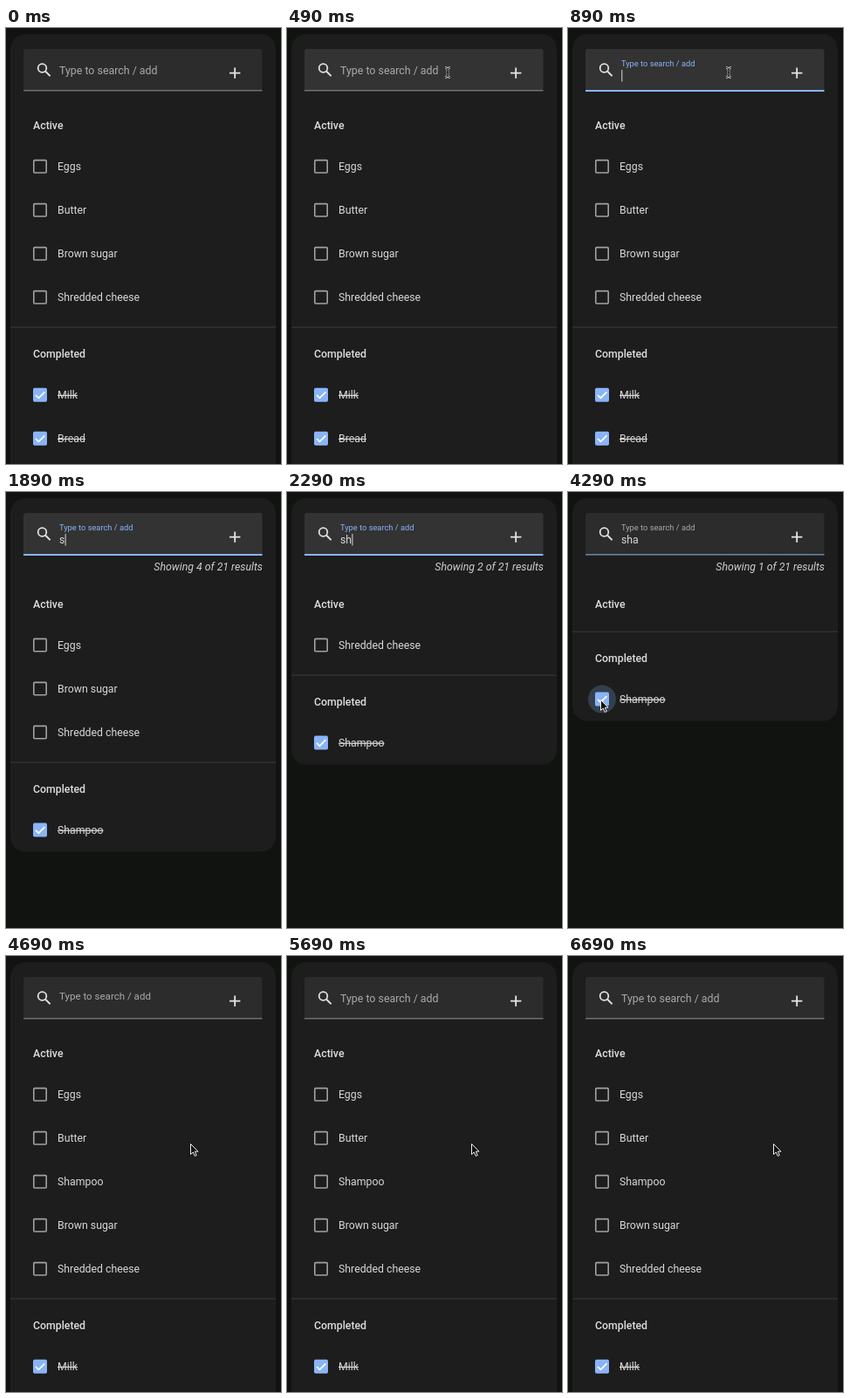
These frames come from a looping animation (315 px wide and 500 px high, 6.89 s). An HTML page:

```html
<!DOCTYPE html>
<html lang="en">
<head>
<meta charset="utf-8">
<title>Shopping list</title>
<style>
  html, body { margin: 0; width: 100%; height: 100%; overflow: hidden; background: #111311; }
  svg { display: block; width: 315px; height: 500px; }
  text { font: 400 12.3px Roboto, Arial, sans-serif; fill: #d9d9d9; white-space: pre; }
  .heading { font-weight: 500; fill: #dedede; }
  .done { text-decoration: line-through; }
  .count { font-style: italic; text-anchor: end; fill: #d0d0d0; }
</style>
</head>
<body>
<svg id="stage" viewBox="0 0 315 500"></svg>
<script>
const LOOP = 6890;
const BLUE = '#8ab4f8';
const stage = document.getElementById('stage');

// The picture advances in discrete steps.
const ticks = [0, 100, 290, 490, 690, 890, 1290, 1690, 1890, 2090, 2290, 2490, 2690,
  3090, 3290, 3490, 3690, 3890, 4090, 4290, 4490, 4690, 4890, 6690];

// Pointer: [time, x, y, shape]
const pointer = [
  [0, 0, 0, ''], [100, 225, 190, 'arrow'], [290, 202, 104, 'arrow'], [490, 184, 51, 'beam'],
  [1690, 0, 0, ''], [3090, 184, 51, 'beam'], [3290, 174, 136, 'arrow'], [3490, 144, 219, 'arrow'],
  [3690, 90, 231, 'arrow'], [3890, 48, 238, 'arrow'], [4090, 37, 238, 'arrow'],
  [4690, 211, 215, 'arrow'], [6690, 235, 215, 'arrow']
];
const typed = [[0, ''], [1690, 's'], [2090, 'sh'], [2490, 'sha'], [4690, '']];
const caretOn = [[0, false], [690, true], [1290, false], [1690, true], [3090, false]];
// How far the label floats above the field
const labelFloat = [[0, 0], [690, .8], [890, 1], [4690, .27], [4890, 0]];

const latest = (keys, t) => keys.findLast(key => key[0] <= t);
const between = (t, a, b) => t >= a && t < b;

const rect = (x, y, w, h, fill, extra = '') =>
  `<rect x="${x}" y="${y}" width="${w}" height="${h}" fill="${fill}" ${extra}/>`;
const path = (d, stroke, width, extra = '') =>
  `<path d="${d}" fill="none" stroke="${stroke}" stroke-width="${width}" ${extra}/>`;
const text = (x, y, content, extra = '') => `<text x="${x}" y="${y}" ${extra}>${content}</text>`;

function checkbox(y, checked) {
  return checked
    ? rect(31, y - 8, 16, 16, BLUE, 'rx="1.8"') + path(`M34 ${y + .2}l3.4 3.4 7-7`, '#fff', 1.7)
    : rect(31.8, y - 7.2, 14.4, 14.4, 'none', 'rx="1" stroke="#a2a2a2" stroke-width="1.6"');
}

function row(name, y, done, checked = done) {
  return checkbox(y, checked) + text(59, y + 4.3, name, done ? 'class="done"' : '');
}

function listState(t, query) {
  const moved = t >= 4690;
  const active = ['Eggs', 'Butter', ...(moved ? ['Shampoo'] : []), 'Brown sugar', 'Shredded cheese'];
  const completed = query ? ['Shampoo'] : ['Milk', 'Bread'];
  const matches = name => name.toLowerCase().includes(query);
  return { active: active.filter(matches), completed };
}

function drawList(t, query) {
  const { active, completed } = listState(t, query);
  const shift = query ? 16.8 : 0;
  const divider = 143 + 50 * active.length + shift;
  const firstDone = divider + 77.8;
  const bottom = query ? firstDone + 25 : 540;
  let out = rect(5, 7, 304, bottom - 7, '#1c1d1c', 'rx="17"');

  if (query) {
    const total = active.length + completed.length;
    out += text(294, 90, `Showing ${total} of 21 results`, 'class="count"');
  }
  out += text(31, 116.2 + shift, 'Active', 'class="heading"');
  active.forEach((name, i) => out += row(name, 158.8 + 50 * i + shift, false));
  out += rect(5, Math.round(divider) - .5, 304, 1.2, '#353635');
  out += text(31, divider + 35.3, 'Completed', 'class="heading"');

  const halo = between(t, 4290, 4690) ? .22 : between(t, 3890, 4290) ? .1 : 0;
  if (halo) out += `<circle cx="39" cy="${firstDone}" r="16" fill="${BLUE}" opacity="${halo}"/>`;
  const unticked = between(t, 4490, 4690);
  completed.forEach((name, i) => out += row(name, firstDone + 50 * i, true, !unticked));
  return out;
}

function drawField(t, query) {
  const focused = between(t, 690, 4290);
  const hovered = between(t, 490, 3290);
  const lift = latest(labelFloat, t)[1];
  let out = `<path d="M20 72V27q0-3 3-3H290.500q3 0 3 3V72z" fill="${hovered ? '#323332' : '#2b2c2b'}"/>`;

  if (focused) out += rect(20, 71, 273.5, 2, BLUE);
  else if (between(t, 4290, 4490)) out += rect(20, 71, 273.5, 1.6, '#6b80a6');
  else out += rect(20, 71.300, 273.5, 1, '#929392');

  out += '<circle cx="41.5" cy="46" r="4.8" fill="none" stroke="#e0e0e0" stroke-width="1.8"/>';
  out += path('M45 49.5l5.600 5.600', '#e0e0e0', 2);
  out += path('M262.2 45.400v12.400M256 51.600h12.400', '#e6e6e6', 1.8);

  const size = 12.4 - 3.1 * lift;
  out += text(61, 52.6 - 8.300 * lift, 'Type to search / add',
    `style="font-size:${size}px;fill:${focused ? BLUE : '#a9aaa9'}"`);
  if (query) out += text(61, 59.2, query, 'id="query"');
  return out;
}

function drawPointer(t) {
  const [, x, y, shape] = latest(pointer, t);
  if (shape === 'arrow') {
    return `<path transform="translate(${x} ${y})" d="M.5 .5V12.500l2.800-2.500 2 4.400 2-.9-2-4.300h3.700z"
      fill="#111" stroke="#eee" stroke-width="1" stroke-linejoin="round"/>`;
  }
  if (shape === 'beam') {
    const d = `M${x - 3} ${y - 5.5}q3 0 3 2.500v6q0 2.500-3 2.500M${x + 3} ${y - 5.5}q-3 0-3 2.500v6q0 2.500 3 2.500M${x - 1.5} ${y}h3`;
    return path(d, '#ddd', 2.6) + path(d, '#161616', 1);
  }
  return '';
}

function render(t) {
  const query = latest(typed, t)[1];
  stage.innerHTML = drawList(t, query) + drawField(t, query);
  if (latest(caretOn, t)[1]) {
    const width = query ? document.getElementById('query').getComputedTextLength() : 0;
    stage.insertAdjacentHTML('beforeend', rect(61.300 + width, 48, 1, 13.5, '#d8d8d8'));
  }
  stage.insertAdjacentHTML('beforeend', drawPointer(t));
}

let shown = -1;
const start = performance.now();
function loop() {
  const t = (performance.now() - start) % LOOP;
  const tick = ticks.findLast(time => time <= t);
  if (tick !== shown) render(shown = tick);
  requestAnimationFrame(loop);
}
loop();
</script>
</body>
</html>
```
